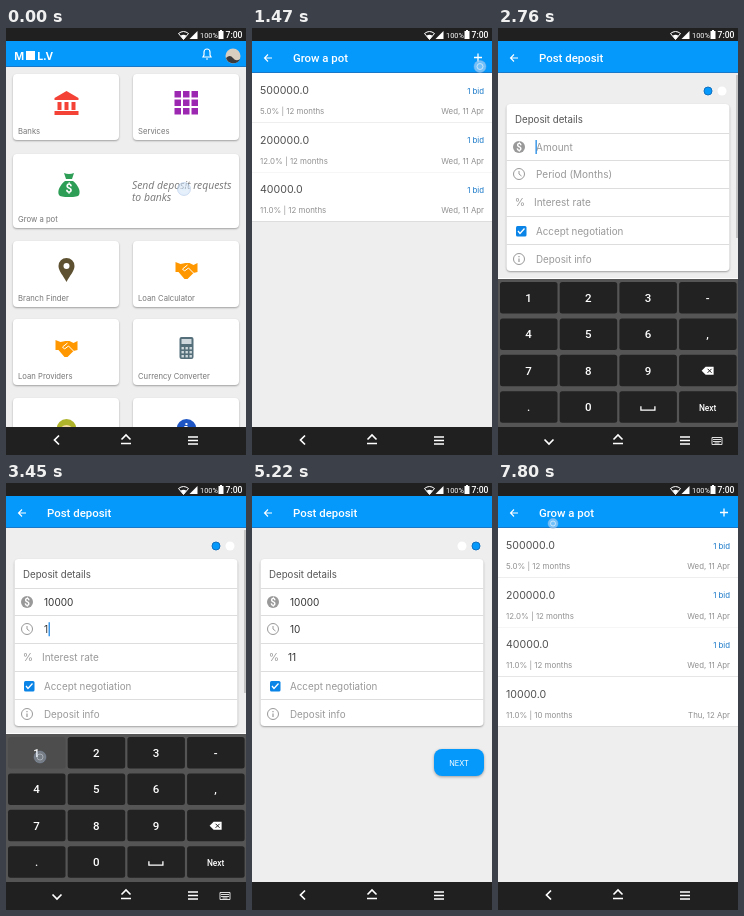
Recreate the animation shown at these times as an HTML page with a canvas. Size 240 by 427 pixels, loop 7.83 s.

```html
<!DOCTYPE html>
<html lang="en">
<head>
<meta charset="utf-8">
<style>
html, body { margin: 0; height: 100%; overflow: hidden; background: #eee }
canvas { display: block; width: 100vw; height: 100vh }
</style>
</head>
<body>
<canvas id="stage" width="240" height="427"></canvas>
<script>
const LOOP = 7830, BLUE = '#0599fc', SYSTEM = '#202020', TITLE = 'Grow a pot';
const TOP = 13, BOTTOM = 399;
const c = document.getElementById('stage').getContext('2d');

const ramp = (t, from, to) => Math.max(0, Math.min(1, (t - from) / (to - from)));
const ease = (t, from, to) => 1 - (1 - ramp(t, from, to)) ** 3;
const pulse = (t, a, b, d, e) => ramp(t, a, b) * (1 - ramp(t, d, e));

function rect(x, y, w, h, fill, r = 0) {
  c.fillStyle = fill;
  c.beginPath();
  c.roundRect(x, y, w, h, r);
  c.fill();
}
function circle(x, y, r, fill, stroke) {
  c.beginPath();
  c.arc(x, y, r, 0, 7);
  if (fill) { c.fillStyle = fill; c.fill(); }
  if (stroke) { c.strokeStyle = stroke; c.lineWidth = 1; c.stroke(); }
}
function text(s, x, y, size, fill, align = 'left', font = 'Inter, sans-serif', style = '') {
  c.font = `${style} ${size}px ${font}`;
  c.textAlign = align;
  c.fillStyle = fill;
  c.fillText(s, x, y);
}
function path(d, x, y, fill, stroke, width = 1.3) {
  const p = new Path2D(d);
  c.save();
  c.translate(x, y);
  if (fill) { c.fillStyle = fill; c.fill(p); }
  if (stroke) { c.strokeStyle = stroke; c.lineWidth = width; c.stroke(p); }
  c.restore();
}
function layer(alpha, dy, draw) {
  if (alpha <= 0) return;
  c.save();
  c.globalAlpha *= alpha;
  c.translate(0, dy);
  draw();
  c.restore();
}
function shadowed(draw, blur = 3, dy = 1) {
  c.save();
  c.shadowColor = '#0005';
  c.shadowBlur = blur;
  c.shadowOffsetY = dy;
  draw();
  c.restore();
}
const card = (x, y, w, h) => shadowed(() => rect(x, y, w, h, '#fff', 4), 2);

function bar(bottom) {
  rect(0, TOP, 240, bottom - TOP, BLUE);
  rect(0, bottom - 1, 240, 1, '#1a78c8');
}

const icons = {
  bank(x, y) {
    path('M-12-5L0-12 12-5V-3H-12zM-9-1h4v8h-4zM-2-1h4v8h-4zM5-1h4v8h-4zM-12 8h24v4h-24z', x, y, '#f44336');
  },
  grid(x, y) {
    for (let i = 0; i < 9; i++) rect(x - 12 + i % 3 * 8.5, y - 12 + (i / 3 | 0) * 8.5, 6.5, 6.5, '#9c27b0');
  },
  bag(x, y) {
    path('M-5-12Q0-10 5-12L3-6H-3zM-4-4H4C9 0 12 6 10 10Q9 12 0 12T-10 10C-12 6-9 0-4-4z', x, y, '#2e9e57');
    text('$', x, y + 8, 12, '#fff', 'center', 'Roboto, sans-serif', '700');
  },
  pin(x, y) {
    path('M0 12C-3 6-8 1-8-4A8 8 0 0 1 8-4C8 1 3 6 0 12z', x, y, '#5d5132');
    circle(x, y - 4, 3, '#fff');
  },
  hands(x, y) {
    path('M-11-8L-6-6-1-7 3-7 7-5 11-7V2L7 3 1 9-2 9-8 2-11 2z', x, y, '#ff9800');
    path('M1-5L-4-1-2 1 2-2 7 3', x, y, null, '#fff', 1);
  },
  calc(x, y) {
    rect(x - 7, y - 11, 14, 22, '#546e7a', 2);
    rect(x - 5, y - 9, 10, 5, '#cfd8dc');
    for (let i = 0; i < 9; i++) rect(x - 5 + i % 3 * 4, y - 1 + (i / 3 | 0) * 4, 2.4, 2.4, '#cfd8dc');
  },
  person(x, y) {
    circle(x, y + 2, 10, '#afb42b');
    circle(x, y + 5, 7, '#f3d9a4');
  },
  info(x, y) {
    circle(x, y + 2, 10, '#1e56c5');
    text('i', x, y + 7, 14, '#fff', 'center', 'Noto Serif, serif', '700');
  }
};

const tiles = [
  [7, 46, 106, 'Banks', 'bank'], [127, 46, 106, 'Services', 'grid'],
  [7, 126, 226, TITLE, 'bag'],
  [7, 213, 106, 'Branch Finder', 'pin'], [127, 213, 106, 'Loan Calculator', 'hands'],
  [7, 291, 106, 'Loan Providers', 'hands'], [127, 291, 106, 'Currency Converter', 'calc'],
  [7, 370, 106, '', 'person'], [127, 370, 106, '', 'info']
];

function home(t) {
  rect(0, TOP, 240, BOTTOM - TOP, '#eee');
  bar(39);
  text('M', 8, 32, 11, '#fff', 'left', 'Noto Sans, sans-serif', '700');
  rect(20, 23, 9, 9, '#fff');
  text('L.V', 31, 32, 11, '#fff', 'left', 'Noto Sans, sans-serif', '700');
  path('M-4 3L-3 1V-2A3 3 0 0 1 3-2V1L4 3zM-1 5H1', 201, 26, null, '#fff', 1.2);
  circle(227, 28, 7.5, '#d8cfc0');
  path('M-7 2Q-3-2 0 2T7 3A7.5 7.5 0 0 1-7 2z', 227, 28, '#3c3a3a');
  for (const [x, y, w, label, icon] of tiles) {
    const wide = w > 200, h = wide ? 74 : 66;
    card(x, y, w, h);
    icons[icon](x + (wide ? 56 : 53.5), y + (wide ? 31 : 29));
    text(label, x + 5, y + h - 6, 7.7, '#777');
  }
  const italic = ['left', 'Open Sans, sans-serif', 'italic'];
  text('Send deposit requests', 126, 161, 10.4, '#777', ...italic);
  text('to banks', 126, 173, 10.4, '#777', ...italic);
  c.save();
  c.beginPath();
  c.roundRect(7, 126, 226, 74, 4);
  c.clip();
  circle(178, 161, 180 * ramp(t, 60, 400), `rgba(0,0,0,${0.1 * pulse(t, 60, 150, 350, 480)})`);
  c.restore();
}

function appBar(title) {
  bar(45);
  path('M4 0H-3.5M0-3.5L-3.5 0 0 3.5', 16, 30, null, '#fff', 1.1);
  text(title, 41, 34, 11.4, '#fff', 'left', 'Roboto, sans-serif', '500');
}

const deposits = [
  ['500000.0', '5.0% | 12 months', 'Wed, 11 Apr', '1 bid'],
  ['200000.0', '12.0% | 12 months', 'Wed, 11 Apr', '1 bid'],
  ['40000.0', '11.0% | 12 months', 'Wed, 11 Apr', '1 bid'],
  ['10000.0', '11.0% | 10 months', 'Thu, 12 Apr', '']
];

function list(count, shown = 1) {
  rect(0, TOP, 240, BOTTOM - TOP, '#eee');
  layer(shown, 0, () => deposits.slice(0, count).forEach(([amount, terms, date, bids], i) => {
    const y = 45 + i * 49.6;
    rect(0, y, 240, 49.6, '#fff');
    rect(0, Math.round(y + 49), 240, 1, '#ddd');
    text(amount, 8, y + 21, 10.6, '#505050');
    text(bids, 232, y + 20.5, 7.8, '#1878c8', 'right');
    text(terms, 8, y + 41, 7.9, '#909090');
    text(date, 232, y + 41, 7.8, '#909090', 'right');
  }));
  appBar(TITLE);
  path('M-4 0H4M0-4V4', 226, 29.5, null, '#fff', 1.3);
}

// Typing: N moves on to the next field.
const strokes = [...'10000N10N11'], TYPE_START = 2850, TYPE_STEP = 95;
const keys = ['1', '2', '3', '-', '4', '5', '6', ',', '7', '8', '9', '<', '.', '0', '_', 'N'];
const keyAt = i => [2 + i % 4 * 59.7, 254 + (i / 4 | 0) * 36.4];
const strokeIndex = t => Math.floor((t - TYPE_START) / TYPE_STEP);

function form(t) {
  const typed = strokes.slice(0, Math.max(0, strokeIndex(t) + 1)).join('').split('N');
  const step = t > 4900 ? 1 : 0, editing = t > 2150 && t < 3960;
  rect(0, TOP, 240, BOTTOM - TOP, '#eee');
  appBar('Post deposit');
  [0, 1].forEach(i => i === step
    ? circle(210 + i * 14, 63, 4, BLUE, '#1170c0')
    : circle(210 + i * 14, 63, 4.5, '#fff'));
  if (editing) rect(238, 47, 2, 163, '#c4c4c4');
  card(8.5, 76, 223, 167);
  text('Deposit details', 17, 95, 9.7, '#555');
  [105, 132, 160, 188, 216].forEach(y => rect(8.5, y, 223, 1, '#ddd'));

  circle(21, 119, 6, '#999');
  text('$', 21, 123, 10, '#fff', 'center', 'Roboto, sans-serif', '700');
  circle(21, 146, 5.5, null, '#999');
  path('M0-3V0L2.5 2', 21, 146, null, '#999', 1);
  text('%', 22, 178, 10.5, '#999', 'center');
  rect(18, 198, 10.5, 10.5, '#0b84e8', 1.5);
  path('M-3 0L-1 2.5 3.5-2.5', 23, 203, null, '#fff');
  circle(21, 231, 5.5, null, '#999');
  path('M0-3V-1.7M0-.5V3', 21, 231, null, '#999', 1.2);

  ['Amount', 'Period (Months)', 'Interest rate'].forEach((hint, i) => {
    const x = i === 2 ? 36 : 38, y = 123 + i * 27.3, value = typed[i] || '';
    text(value || hint, x, y, 10, value ? '#333' : '#999');
    if (editing && i === typed.length - 1)
      rect(x - 0.5 + (value && c.measureText(value).width + 1), y - 11, 1.3, 14, '#1e88e5');
  });
  text('Accept negotiation', 38, 206.5, 9.8, '#999');
  text('Deposit info', 38, 235, 9.8, '#999');

  shadowed(() => rect(182, 266, 50, 27, BLUE, 8));
  rect(182, 266, 50, 27, `rgba(255,255,255,${0.3 * (pulse(t, 4600, 4700, 4800, 4900) + pulse(t, 5350, 5450, 5550, 5650))})`, 8);
  text('NEXT', 207, 282.5, 7.4, '#fff', 'center');
}

// The panel slides in from below while a white veil lifts off it.
function keyboard(t) {
  const shown = pulse(t, 2280, 2415, 3960, 4060);
  if (!shown) return;
  const i = strokeIndex(t), pressed = i >= 0 && strokes[i];
  const veil = `rgba(255,255,255,${0.95 * (1 - shown)})`;
  if (t < 3960) rect(0, 250, 240, 150, '#fff');
  layer(1, (t < 3960 ? 30 : 150) * (1 - shown), () => {
    rect(0, 251, 240, 176, '#555');
    keys.forEach((key, k) => {
      const [x, y] = keyAt(k), cx = x + 28.5, cy = y + 16;
      rect(x, y, 57.5, 31.5, key === pressed ? '#4d4d4d' : '#222', 2.5);
      if (key === '<') {
        path('M-6 0L-2-4H6V4H-2z', cx, cy, '#fff');
        path('M0-2L4 2M4-2L0 2', cx, cy, null, '#222', 1);
      } else if (key === '_') path('M-7-1V3H7V-1', cx, cy, null, '#fff');
      else text(key === 'N' ? 'Next' : key, cx, cy + 4, key === 'N' ? 8.4 : 11.5, '#fff', 'center', 'Roboto, sans-serif', '500');
    });
    rect(0, 251, 240, 176, veil);
  });
}

function systemBars(t) {
  rect(0, 0, 240, TOP, SYSTEM);
  path('M0 4.5L-5-1.5Q0-5.5 5-1.5z', 177.5, 7, null, '#fff', 1);
  path('M0 4.5L-3 .8Q0-1.5 3 .8z', 177.5, 7, '#fff');
  path('M-4 4H4V-4z', 187.5, 7, '#fff');
  text('100%', 194, 10, 7.4, '#fff', 'left', 'Roboto, sans-serif');
  path('M-2.5-3.5H-1V-4.5H1V-3.5H2.5V4.5H-2.5z', 215, 6.5, '#fff');
  text('7:00', 219.5, 10, 8.6, '#fff', 'left', 'Roboto, sans-serif', '500');

  const typing = t > 2200 && t < 4060;
  rect(0, BOTTOM, 240, 427 - BOTTOM, SYSTEM);
  rect(21, 400, 60, 27, `rgba(255,255,255,${0.13 * pulse(t, 3900, 3960, 4280, 4480)})`, 13);
  path(typing ? 'M-4.5-2.5L0 2 4.5-2.5' : 'M2-4.5L-2.5 0 2 4.5', 51, typing ? 414 : 412, null, '#fff', 1.7);
  path('M-4.5 .5L0-4 4.5 .5M-5 4.5H5', 120, 411, null, '#fff', 1.6);
  path('M-5-4H5M-5-.5H5M-5 3H5', 187, 413, null, '#fff', 1.6);
  if (typing) {
    path('M-5-3.5H5V3.5H-5z', 219, 413, null, '#ddd', 1);
    path('M-4-1.5H4M-4 .5H4M-2.5 2H2.5', 219, 413, null, '#ddd', 1);
  }
}

function toast(t) {
  layer(pulse(t, 5880, 6060, 6900, 7170), 0, () => {
    rect(49, 338, 142, 25, '#757575', 12.5);
    text('Deposit posted successfully', 120, 354, 9.1, '#fff', 'center', 'Roboto, sans-serif');
  });
}

function touch(x, y, r, alpha) {
  layer(alpha, 0, () => {
    circle(x, y, r, 'rgba(205,225,250,.55)', 'rgba(150,180,220,.4)');
    circle(x, y, r / 2, null, 'rgba(235,242,250,.7)');
  });
}

function touches(t) {
  touch(178, 161, 6.5, 1 - ramp(t, 30, 200));
  touch(228, 38.5, 6, pulse(t, 1380, 1440, 1530, 1640));
  const i = strokeIndex(t);
  if (i >= 0 && i < strokes.length) {
    const [x, y] = keyAt(keys.indexOf(strokes[i]));
    touch(x + 32, y + 20, 6, 0.6);
  }
  touch(51, 413, 6, pulse(t, 3870, 3920, 4000, 4150));
  touch(207, 282, 6, pulse(t, 4560, 4640, 4760, 4880) + pulse(t, 5310, 5390, 5510, 5640));
  const last = ramp(t, 7500, 7650);
  touch(55, 40.5, 3 + 2 * last, last);
}

function draw(t) {
  c.fillStyle = '#eee';
  c.fillRect(0, 0, 240, 427);
  if (t < 700) home(t);
  if (t >= 400 && t < 1960) {
    const enter = ease(t, 400, 700);
    layer(enter, 40 * (1 - enter), () => list(3, ramp(t, 780, 900)));
  }
  if (t >= 1650 && t < 5700) {
    const enter = ease(t, 1650, 1950);
    layer(enter, 40 * (1 - enter), () => form(t));
    keyboard(t);
  }
  if (t >= 5700) list(4);
  toast(t);
  systemBars(t);
  touches(t);
}

function tick(now) {
  draw(now % LOOP);
  requestAnimationFrame(tick);
}
draw(0);
requestAnimationFrame(tick);
</script>
</body>
</html>
```
